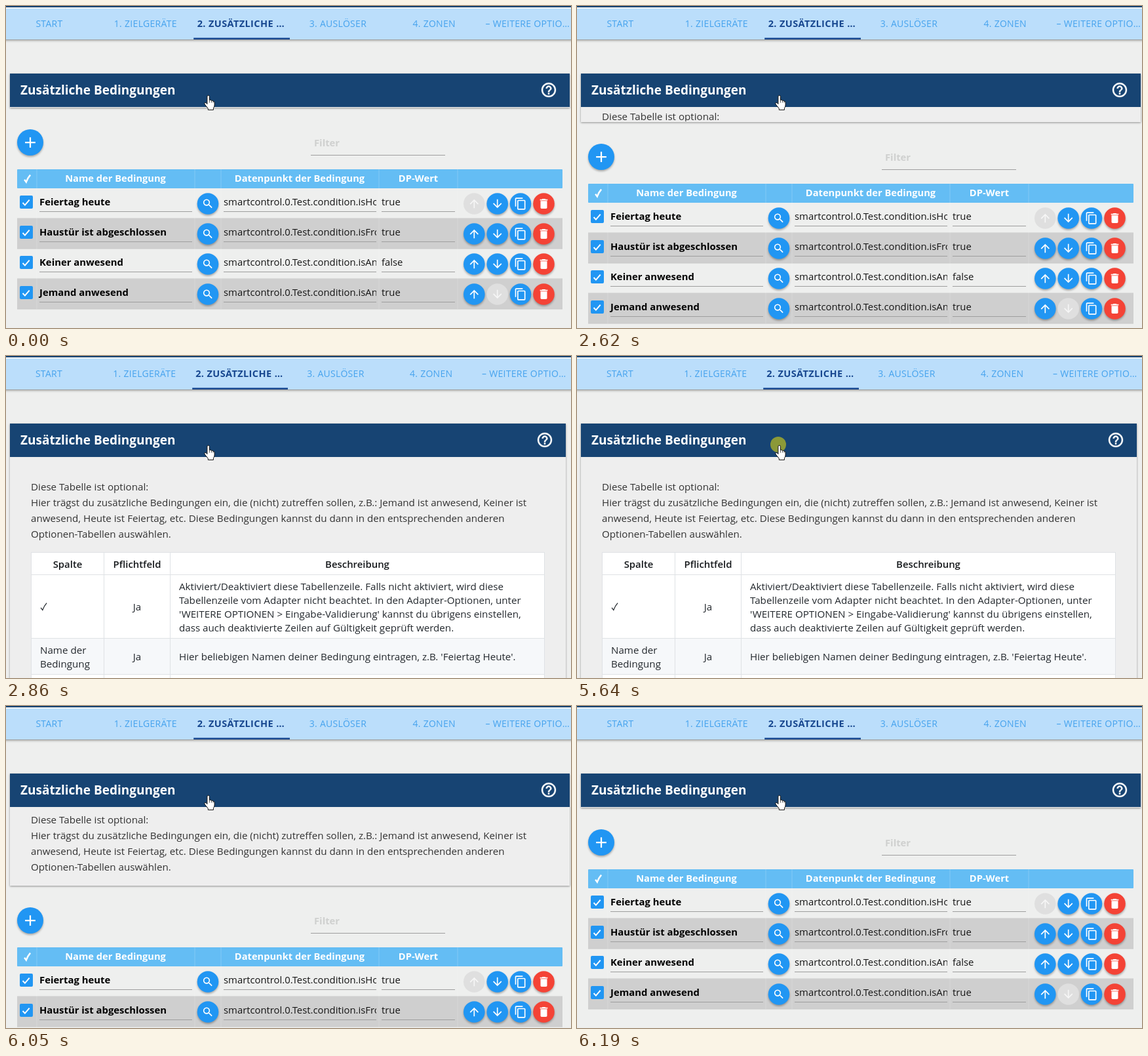
An HTML page that plays this animation: 862 by 491 pixels, repeating every 6.65 s.

```html
<!DOCTYPE html>
<html lang="de">
<head>
<meta charset="utf-8">
<title>Zusätzliche Bedingungen</title>
<style>
  html, body { margin: 0; width: 100%; height: 100%; overflow: hidden; background: #eeefee; }
  svg { display: block; width: 862px; height: 491px; font: 14.85px "Open Sans", "Noto Sans", sans-serif; }
  .tab { font-size: 14px; letter-spacing: .3px; fill: #46a3ee; text-anchor: middle; }
  .tab.on { font-size: 14.5px; letter-spacing: .4px; font-weight: 700; fill: #17478f; }
  .title { font-size: 19px; font-weight: 700; fill: #fff; }
  .para { font-size: 15.16px; fill: #333; }
  .cell { font-size: 15.17px; fill: #24292e; }
  .th { font-size: 14.9px; font-weight: 600; fill: #16191c; text-anchor: middle; }
  .mid { text-anchor: middle; }
  .head { font-size: 14.67px; font-weight: 700; fill: #fff; text-anchor: middle; }
  .name { font-size: 14.86px; font-weight: 700; }
  .val { fill: #151515; }
  .filter { font-size: 14.8px; font-weight: 700; fill: #cfd0cf; }
  .line { stroke: #9e9e9e; }
  .raised { filter: drop-shadow(0 2px 1.5px rgba(0, 0, 0, .3)); }
  .card { filter: drop-shadow(0 1.5px 1.5px rgba(0, 0, 0, .4)); }
</style>
</head>
<body>
<svg id="stage" viewBox="0 0 862 491"></svg>
<script>
const LOOP = 6650;
const BODY_HEIGHT = 596, PAD = 32, SLIDE = 300;
const OPEN_AT = 2557, CLOSE_AT = 5860.5;
const REFRESH = [0, 2380, 2530, 2620, 2680, 2770, 2860, 5640, 5880, 5965, 6050, 6110, 6190];
const BLUE = '#2196f3', RED = '#f44336', OFF = '#dfdfdf';

const ICON = {
  add: 'M19 13h-6v6h-2v-6H5v-2h6V5h2v6h6z',
  search: 'M15.5 14h-.79l-.28-.27A6.47 6.47 0 0 0 16 9.5 6.5 6.5 0 1 0 9.5 16c1.61 0 3.09-.59 4.23-1.57l.27.28v.79l5 4.99L20.49 19zm-6 0C7.01 14 5 11.99 5 9.5S7.01 5 9.5 5 14 7.01 14 9.5 11.99 14 9.5 14z',
  up: 'M4 12l1.41 1.41L11 7.83V20h2V7.83l5.58 5.59L20 12l-8-8z',
  down: 'M20 12l-1.41-1.41L13 16.17V4h-2v12.17l-5.58-5.59L4 12l8 8z',
  copy: 'M16 1H4c-1.1 0-2 .9-2 2v14h2V3h12zm3 4H8c-1.1 0-2 .9-2 2v14c0 1.1.9 2 2 2h11c1.1 0 2-.9 2-2V7c0-1.1-.9-2-2-2zm0 16H8V7h11z',
  trash: 'M6 19c0 1.1.9 2 2 2h8c1.1 0 2-.9 2-2V7H6zM19 4h-3.5l-1-1h-5l-1 1H5v2h14z',
  help: 'M11 18h2v-2h-2zm1-16C6.48 2 2 6.48 2 12s4.48 10 10 10 10-4.48 10-10S17.52 2 12 2zm0 18c-4.41 0-8-3.59-8-8s3.59-8 8-8 8 3.59 8 8-3.59 8-8 8zm0-14c-2.21 0-4 1.79-4 4h2c0-1.1.9-2 2-2s2 .9 2 2c0 2-3 1.75-3 5h2c0-2.25 3-2.5 3-5 0-2.21-1.79-4-4-4z'
};

const text = (x, y, cls, s) => `<text x="${x}" y="${y}" class="${cls}">${s}</text>`;
const rect = (x, y, w, h, fill, more = '') =>
  `<rect x="${x}" y="${y}" width="${w}" height="${h}" fill="${fill}" ${more}/>`;
const hline = (x1, x2, y) => `<path class="line" d="M${x1} ${y}H${x2}"/>`;
const icon = (name, x, y, size, fill = '#fff') =>
  `<path d="${ICON[name]}" fill="${fill}" transform="translate(${x - size / 2} ${y - size / 2}) scale(${size / 24})"/>`;
const button = (name, x, y, fill, r = 16.3, size = 20) =>
  `<circle cx="${x}" cy="${y}" r="${r}" fill="${fill}" ${fill === OFF ? '' : 'class="raised"'}/>` +
  icon(name, x, y, size, fill === OFF ? '#f6f6f6' : '#fff');
const boxTick = (x, y) =>
  `<path d="M${x - 5} ${y + .5}l3.4 3.6l6.8-8" fill="none" stroke="#fff" stroke-width="2"/>`;
// the typographic check mark, taller than wide
const checkMark = (x, y, color, width) =>
  `<path d="M${x - 4.4} ${y + 1.8}l2.700 3.600q2.200-6.200 6.300-10.800" fill="none" stroke="${color}" stroke-width="${width}"/>`;

const tabs = [['START', 0], ['1. ZIELGERÄTE', 0], ['2. ZUSÄTZLICHE …', -1.3],
              ['3. AUSLÖSER', 0], ['4. ZONEN', 0], ['– WEITERE OPTIO…', -4.3]];

const conditions = [['Feiertag heute', 'isHoliday', 'true'],
                    ['Haustür ist abgeschlossen', 'isFrontDoorLocked', 'true'],
                    ['Keiner anwesend', 'isAnyonePresent', 'false'],
                    ['Jemand anwesend', 'isAnyonePresent', 'true']];

function row([name, point, value], i) {
  const y = 278 + 46 * i;
  return (i % 2 ? rect(17, y, 832, 46, '#cfcfcf') : '') +
    rect(17, y + 45.5, 832, 1, '#c9c9c9') +
    rect(21, y + 11, 20, 20, BLUE, 'rx="2"') + boxTick(30.5, y + 21.5) +
    text(51, y + 26, 'name', name) + hline(51, 284, y + 35.5) +
    button('search', 308, y + 23.5, BLUE, 16.3, 19) +
    `<g clip-path="url(#field)">${text(332, y + 26, 'val', 'smartcontrol.0.Test.condition.' + point)}</g>` +
    hline(332, 565, y + 35.5) +
    text(573, y + 26, 'val', value) + hline(573, 685, y + 35.5) +
    button('up', 714.3, y + 23.5, i === 0 ? OFF : BLUE) +
    button('down', 749.7, y + 23.5, i === 3 ? OFF : BLUE) +
    button('copy', 785, y + 23.5, BLUE) +
    button('trash', 820.5, y + 23.5, RED);
}

const separators = [47, 288, 328, 569, 689]
  .map(x => rect(x - .5, 249, 1, 213, '#fff', 'opacity=".2"')).join('');

const conditionTable =
  button('add', 37, 208, BLUE, 20, 27) +
  text(470, 214, 'filter', 'Filter') + hline(465, 670, 227.5) +
  rect(17, 249, 832, 29, '#64bdf4', 'rx="1"') +
  checkMark(32.5, 263, '#fff', 2.4) +
  text(167, 268, 'head', 'Name der Bedingung') +
  text(448, 268, 'head', 'Datenpunkt der Bedingung') +
  text(629, 268, 'head', 'DP-Wert') +
  conditions.map(row).join('') + separators;

const lines = (x, y, step, cls, list) => list.map((s, i) => text(x, y + i * step, cls, s)).join('');

const help =
  lines(38, 205, 24, 'para', [
    'Diese Tabelle ist optional:',
    'Hier trägst du zusätzliche Bedingungen ein, die (nicht) zutreffen sollen, z.B.: Jemand ist anwesend, Keiner ist',
    'anwesend, Heute ist Feiertag, etc. Diese Bedingungen kannst du dann in den entsprechenden anderen',
    'Optionen-Tabellen auswählen.']) +
  rect(38, 299, 784, 400, '#fff', 'class="wide"') +
  rect(38, 430.5, 784, 55, '#f6f8fa', 'class="wide"') +
  [299, 333, 430, 485].map(y => rect(38, y, 784, 1, '#dfe2e5', 'class="wide"')).join('') +
  [38, 149, 250].map(x => rect(x, 299, 1, 400, '#dfe2e5')).join('') +
  rect(821, 299, 1, 400, '#dfe2e5', 'id="edge"') +
  text(94, 323, 'th', 'Spalte') + text(200, 323, 'th', 'Pflichtfeld') + text(536, 323, 'th', 'Beschreibung') +
  checkMark(57.5, 382, '#24292e', 1.3) + text(200, 388, 'cell mid', 'Ja') +
  lines(264, 357, 21, 'cell', [
    'Aktiviert/Deaktiviert diese Tabellenzeile. Falls nicht aktiviert, wird diese',
    'Tabellenzeile vom Adapter nicht beachtet. In den Adapter-Optionen, unter',
    "'WEITERE OPTIONEN &gt; Eingabe-Validierung' kannst du übrigens einstellen,",
    'dass auch deaktivierte Zeilen auf Gültigkeit geprüft werden.']) +
  lines(52, 454, 21, 'cell', ['Name der', 'Bedingung']) + text(200, 464, 'cell mid', 'Ja') +
  text(264, 464, 'cell', "Hier beliebigen Namen deiner Bedingung eintragen, z.B. 'Feiertag Heute'.");

const hand = `<g transform="translate(-.5 0)" stroke="#111">
  <path d="M307.4 149.5V138.3q0-2 1.8-2t1.8 2V143.4q2.6-.9 2.9 .9q2.3-.7 2.6 1q2.1-.4 2.1 1.7V151
    q0 2.6-1.7 4.7V158.4H308.8V156.3L304.2 150.6q-1.7-2.2-.3-3.2q1.5-.9 3.5 2.1z"
    fill="#fff" stroke-linejoin="round"/>
  <path d="M311 143.5V147.500M313.900 144.300V147.500M316.500 145.300V147.500" stroke-width=".7"/></g>`;

document.getElementById('stage').innerHTML = `
  <defs>
    <clipPath id="field"><rect x="332" y="249" width="233" height="300"/></clipPath>
    <clipPath id="panel"><rect id="panelBox" x="6" y="154" width="854" height="0"/></clipPath>
    <linearGradient id="fade" x2="0" y2="1">
      <stop stop-opacity=".4"/><stop offset=".35" stop-opacity=".14"/><stop offset="1" stop-opacity="0"/>
    </linearGradient>
  </defs>
  ${rect(0, 0, 862, 491, '#eeefee')}
  <g id="table">${conditionTable}</g>
  ${rect(6, 103, 854, 52, '#eeeeee', 'id="card" class="card"')}
  ${rect(6, 103, 854, 51, '#174473', 'id="bar"')}
  ${text(22, 135, 'title', 'Zusätzliche Bedingungen')}
  <g id="helpIcon" stroke="#fff" stroke-width=".3">${icon('help', 828, 128, 26.5)}</g>
  <g clip-path="url(#panel)"><g id="help">${help}</g></g>
  ${rect(0, 0, 862, 2, '#174473')}
  ${rect(0, 2, 862, 2, '#eef3f8')}
  ${rect(0, 4, 862, 47, '#bbdefb')}
  ${rect(0, 51, 862, 5, 'url(#fade)')}
  ${tabs.map(([s], i) => text(0, 32, i === 2 ? 'tab on' : 'tab', s)).join('')}
  ${rect(286, 48.5, 147, 2.5, '#17478f', 'id="mark"')}
  <circle id="click" cx="307" cy="135" r="12" fill="#8b9938"/>
  ${hand}`;

const $ = id => document.getElementById(id);
const set = (el, name, value) => el.setAttribute(name, value);
const tabEls = document.querySelectorAll('.tab');
const wideEls = document.querySelectorAll('.wide');

const ease = t => t < .5 ? 4 * t ** 3 : 1 - 4 * (1 - t) ** 3;
const ramp = (t, start) => ease(Math.min(1, Math.max(0, (t - start) / SLIDE)));

function draw(time) {
  const t = REFRESH.filter(s => s <= time).pop();
  const open = ramp(t, OPEN_AT) - ramp(t, CLOSE_AT);
  const height = Math.round(BODY_HEIGHT * open);
  // a tall page gains a scrollbar, which narrows the layout
  const narrow = open > .5 ? 6 : 0;
  const pitch = narrow ? 145.8 : 146.8;
  const first = narrow ? 65.5 : 66;

  tabEls.forEach((el, i) => set(el, 'x', first + pitch * i + tabs[i][1]));
  set($('mark'), 'x', first + pitch * 1.5);
  set($('mark'), 'width', pitch);
  for (const id of ['card', 'bar', 'panelBox']) set($(id), 'width', 854 - narrow);
  wideEls.forEach(el => set(el, 'width', 790 - narrow));
  set($('edge'), 'x', 827 - narrow);
  set($('helpIcon'), 'transform', `translate(${-narrow} 0)`);
  set($('card'), 'height', 52 + height);
  set($('panelBox'), 'height', height);
  set($('help'), 'transform', `translate(0 ${Math.round(PAD * (open - 1))})`);
  set($('table'), 'transform', `translate(0 ${height})`);
  const pressed = (t >= 2380 && t < 2530) || (t >= 5640 && t < 5880);
  set($('click'), 'visibility', pressed ? 'visible' : 'hidden');
}

const start = performance.now();
function loop() {
  draw((performance.now() - start) % LOOP);
  requestAnimationFrame(loop);
}
loop();
</script>
</body>
</html>
```
